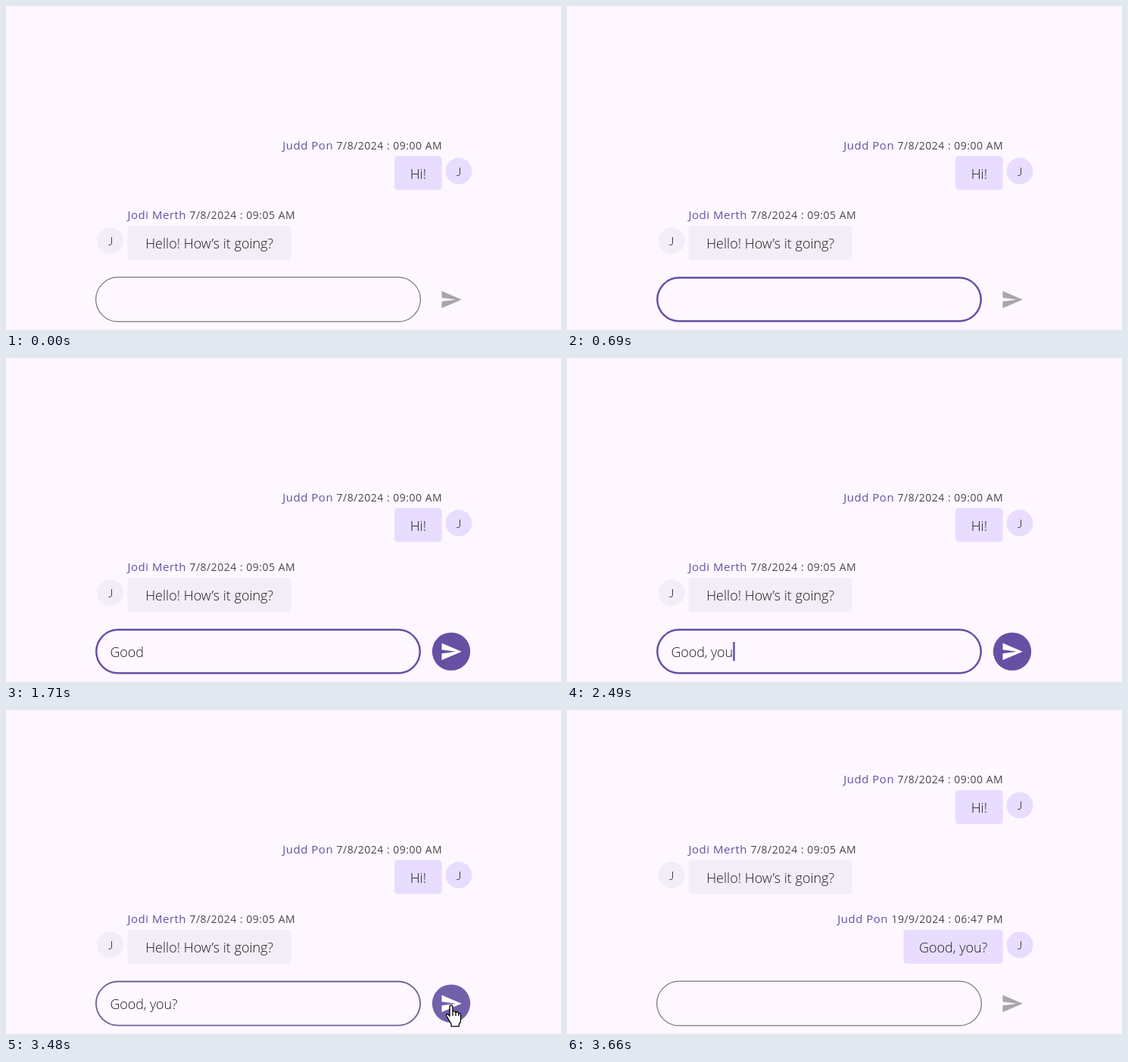
These frames come from a looping animation (733x429 px, 4.29 s). An HTML page:

```html
<!DOCTYPE html>
<html lang="en">
<head>
<meta charset="utf-8">
<style>
html, body { margin: 0; width: 100%; height: 100%; overflow: hidden; background: #fef7ff; }
svg { display: block; font: 350 18px "Open Sans", "Noto Sans", sans-serif; fill: #1d1b20; }
.head { font-size: 15px; font-weight: 500; letter-spacing: .5px; fill: #6750a4; }
.head tspan { font-size: 14px; fill: #49454f; }
.initial { font: 300 16px Lato, sans-serif; text-anchor: middle; }
#typed { letter-spacing: -.15px; }
</style>
</head>
<body>
<svg width="733" height="429" viewBox="0 0 733 429">
  <g id="rows"></g>
  <rect id="field" fill="none"/>
  <text id="typed" x="137.5" y="396"></text>
  <rect id="caret" y="376" width="2.5" height="25" fill="#6750a4"/>
  <circle id="button" cx="588" cy="388.6" r="25.2"/>
  <path id="send" transform="translate(573 373.8) scale(1.25)" d="M2.01 21L23 12 2.01 3 2 10l15 2-15 2z"/>
  <path id="beam" d="M-4 -8.5h3q1 0 1 1 0-1 1-1h3M0-8v16M-4 8.5h3q1 0 1-1 0 1 1 1h3" fill="none" stroke="#000" stroke-width="1.6"/>
  <path id="hand" d="M5 15V3q0-2.2 2-2.2t2 2.2v7q0-1.4 2-1.2t2 2q.5-1.2 2-1t1.8 2q2.8-.6 2.8 2v6.5q0 3.5-2.2 5.5v3H7v-3L1 15.5q-1.2-2 .4-2.8 1.8-.4 3.6 2.8zM9 10v5M13 11v4M16.8 12v3" fill="#fff" stroke="#000" stroke-width="1.3" stroke-linejoin="round"/>
</svg>
<script>
const LOOP = 4290, SENT = 3570, STEP = 92.4, LEFT = 160.5, RIGHT = 575.7;
const GREY = [121, 116, 126], DARK = [29, 27, 32], PURPLE = [103, 80, 164];
const HOVER = [115, 96, 171], DISABLED = [169, 163, 171], WHITE = [255, 255, 255];
const $ = id => document.getElementById(id);

const messages = [
  { name: 'Judd Pon', date: '7/8/2024 : 09:00 AM', text: 'Hi!', width: 62.7, mine: true },
  { name: 'Jodi Merth', date: '7/8/2024 : 09:05 AM', text: 'Hello! How’s it going?', width: 216.3 },
  { name: 'Judd Pon', date: '19/9/2024 : 06:47 PM', text: 'Good, you?', width: 131.2, mine: true }
];
// [time, number of characters typed]
const keys = [[930, 1], [1080, 2], [1320, 3], [1500, 4], [1950, 5], [1980, 6],
  [2400, 7], [2460, 8], [2490, 9], [2790, 10], [SENT, 0]];
const caretOff = [[690, 930], [1710, 1950], [2190, 2400], [2730, 2790], [3000, 3210]];

$('rows').innerHTML = messages.map(({ name, date, text, width, mine }) => {
  const x = mine ? RIGHT - width : LEFT, fill = mine ? '#e8ddff' : '#f3edf7';
  const cx = mine ? 598 : 138;
  return `<g>
    <text class="head" x="${mine ? RIGHT + .5 : LEFT}" y="-9" text-anchor="${mine ? 'end' : 'start'}">${name} <tspan>${date}</tspan></text>
    <rect x="${x}" width="${width}" height="45" rx="4.5" fill="${fill}"/>
    <text x="${x + width / 2}" y="30" text-anchor="middle">${text}</text>
    <circle cx="${cx}" cy="20" r="17.5" fill="${fill}"/>
    <text class="initial" x="${cx}" y="26.3">${name[0]}</text>
  </g>`;
}).join('');
const rows = [...$('rows').children];

const ramp = (t, from, to) => Math.min(1, Math.max(0, (t - from) / (to - from)));
const ease = p => p * p * (3 - 2 * p);
const mix = (a, b, p) => a.map((v, i) => v + (b[i] - v) * p);
const rgb = c => `rgb(${c.map(Math.round)})`;
const set = (id, attrs) => { for (const k in attrs) $(id).setAttribute(k, attrs[k]); };
const show = (el, on) => { el.style.display = on ? '' : 'none'; };

function draw(t) {
  const sent = t >= SENT;
  rows.forEach((row, i) => {
    row.setAttribute('transform', `translate(0 ${291 - STEP * ((sent ? 2 : 1) - i)})`);
    show(row, sent || i < 2);
  });

  // Field outline: idle, hovered, focused, idle
  const focus = ramp(t, 420, 540), blur = ramp(t, 3420, 3540);
  const w = 1.25 + 1.25 * (focus - blur);
  const hovered = mix(GREY, DARK, ramp(t, 345, 405));
  set('field', {
    x: 118 + w / 2, y: 358.6 + w / 2, width: 430 - w, height: 60 - w, rx: 30 - w / 2,
    stroke: rgb(mix(mix(hovered, PURPLE, focus), GREY, blur)), 'stroke-width': w
  });

  const count = keys.reduce((n, [at, c]) => t >= at ? c : n, 0);
  $('typed').textContent = messages[2].text.slice(0, count);
  // A trailing space is collapsed by the text element, so it is added here
  const space = count === 6 ? 4.4 : 0;
  set('caret', { x: 137.8 + (count ? $('typed').getComputedTextLength() + space : 0) });
  show($('caret'), t >= 450 && t < 3420 && !caretOff.some(([a, b]) => t >= a && t < b));

  const active = ramp(t, 915, 975) - ramp(t, SENT, SENT + 75);
  set('button', { fill: rgb(mix(PURPLE, HOVER, ramp(t, 3390, 3450))), opacity: active });
  set('send', { fill: rgb(mix(DISABLED, WHITE, active)) });

  const enter = ease(ramp(t, 345, 465));
  set('beam', { transform: `translate(${214 - 4 * enter} ${428 - 28 * enter})` });
  show($('beam'), t >= 360 && t < 540);

  const away = 1 - ease(ramp(t, 3345, 3465)) + ease(ramp(t, 3540, 3660));
  set('hand', { transform: `translate(${581 + 6 * away} ${390 + 40 * away})` });
  show($('hand'), t >= 3360 && t < 3660);
}

const start = performance.now();
function tick() {
  draw((performance.now() - start) % LOOP);
  requestAnimationFrame(tick);
}
tick();
</script>
</body>
</html>
```
